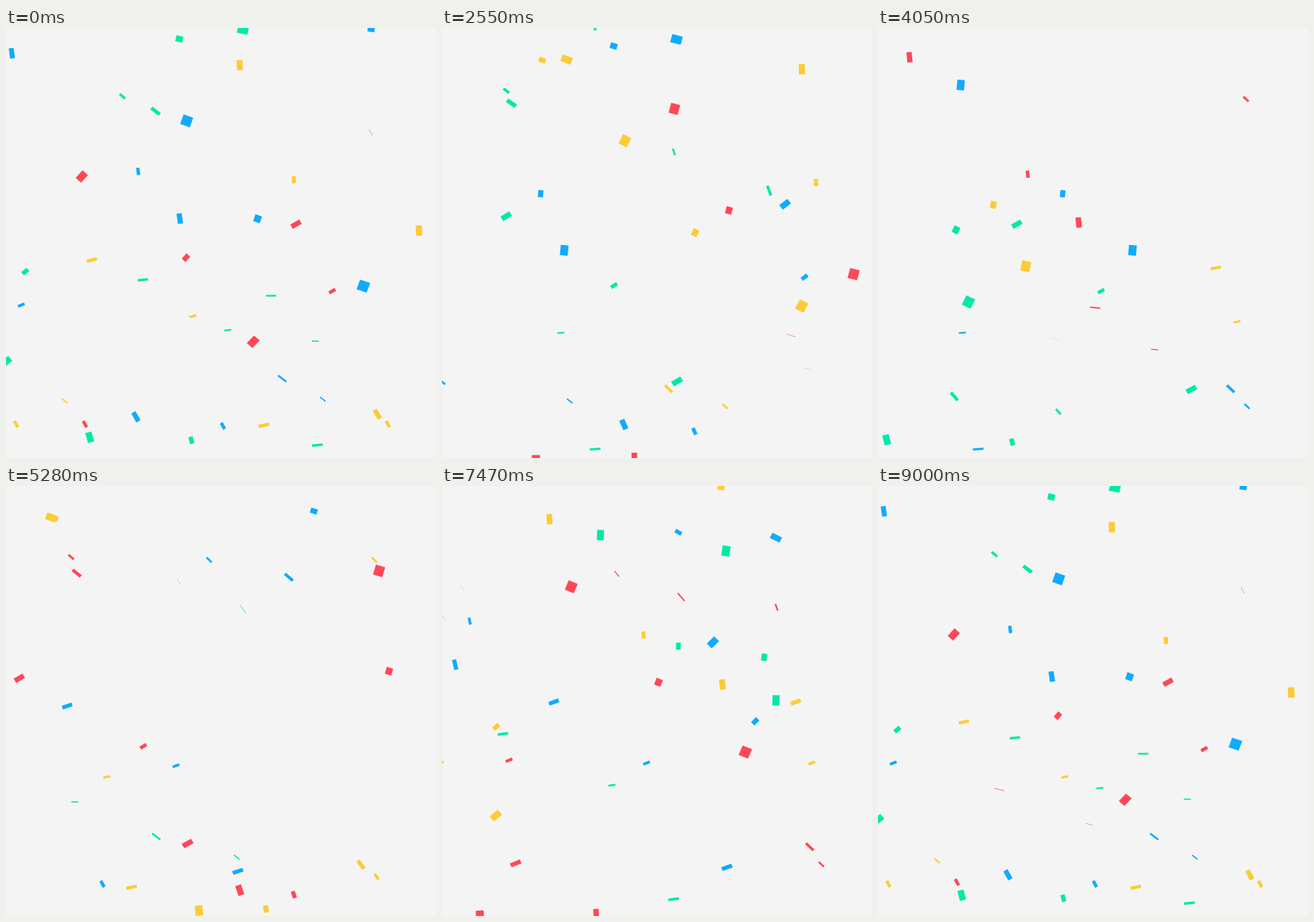
Animation of 640x640 px, one loop 9.03 s. Source, as an HTML page with a canvas:

```html
<!DOCTYPE html>
<html lang="en">
<head>
<meta charset="utf-8">
<title>Confetti</title>
<style>
  html, body { margin: 0; width: 100%; height: 100%; overflow: hidden; background: #f4f4f4; }
  canvas { display: block; width: 640px; height: 640px; }
</style>
</head>
<body>
<canvas id="stage" width="640" height="640"></canvas>
<script>
const ctx = document.getElementById('stage').getContext('2d');
const STEP = 30, STEPS = 301;
const SIZE = 15.3;
const columnX = c => 37.5 * c - 289.7;

// One shower of pieces, drawn three times
const LAYERS = [
  { sx: 0.683, sy: 0.7, x: 190.8, y: 187.2 },
  { sx: 1, sy: 1, x: 0, y: 0 },
  { sx: 1.05, sy: 1, x: 249.5, y: 246 }
];

// Each drop is [step, column]; a drop marked true does not carry over the seam
const GROUPS = [
  { color: '#fdcb35', period: 299, drops: [[56, 14.2], [74, 21], [116, 6], [194, 21.6], [194, 0], [207, 3], [240, 11], [289, 16]] },
  { color: '#10abff', period: 300, drops: [[70, 5], [120, 10], [194, 12], [209, 18], [245, 1], [276, 14], [293, 7], [340, 21]] },
  { color: '#00e9a6', period: 300, drops: [[85, 13], [107, 4], [186, 10], [232, 18], [236, 13], [257, 1], [320, 7], [337, 10]] },
  { color: '#ff4757', period: 300, drops: [[64, 16], [127, 8], [154, 21.6], [195, 4], [223, 12, true], [250, 19], [262, 10.2], [307, 21]] }
];

// Turning points of the sideways sway: [age, x]
const SWAY = [[-56, 38], [-25.5, 0], [12, 38], [60, 5], [84, 25], [156, 65]];

function swayAt(age) {
  const i = SWAY.findIndex(([end]) => age < end);
  const [a0, x0] = SWAY[i - 1], [a1, x1] = SWAY[i];
  const ease = (1 - Math.cos(Math.PI * (age - a0) / (a1 - a0))) / 2;
  return x0 + (x1 - x0) * ease;
}

// Steady fall, quicker on entry and slower near the floor
function fallAt(age) {
  const entry = Math.min(0, age + 24.2), floor = Math.max(0, age - 84.3);
  return 5.917 * age + 1.58 * entry - 2.12 * floor;
}

// Width while tumbling: edge-on at ages -9.3 and 81, full at 23
function widthAt(age) {
  if (age < 23) return Math.min(SIZE, 0.47 * Math.abs(age + 9.3));
  if (age < 81) return SIZE * ((81 - age) / 58) ** 1.2;
  return 0.295 * (age - 81);
}

function drawPiece(x, age) {
  if (age < -55 || age > 135) return;
  const w = widthAt(age);
  const turn = (1.6035 * age - 17.9) * Math.PI / 180;
  for (const layer of LAYERS) {
    ctx.setTransform(layer.sx, 0, 0, layer.sy, layer.x, layer.y);
    ctx.translate(x + swayAt(age), fallAt(age));
    ctx.rotate(turn);
    ctx.fillRect(-w / 2, -SIZE / 2, w, SIZE);
  }
}

function render(step) {
  ctx.setTransform(1, 0, 0, 1, 0, 0);
  ctx.fillStyle = '#f4f4f4';
  ctx.fillRect(0, 0, 640, 640);
  for (const { color, period, drops } of GROUPS) {
    ctx.fillStyle = color;
    for (const [start, column, once] of drops) {
      const age = step - start - 0.65;
      drawPiece(columnX(column), age);
      if (!once) drawPiece(columnX(column), age + period);
    }
  }
}

const begin = performance.now();
function tick() {
  render(Math.floor((performance.now() - begin) / STEP) % STEPS);
  requestAnimationFrame(tick);
}
tick();
</script>
</body>
</html>
```
